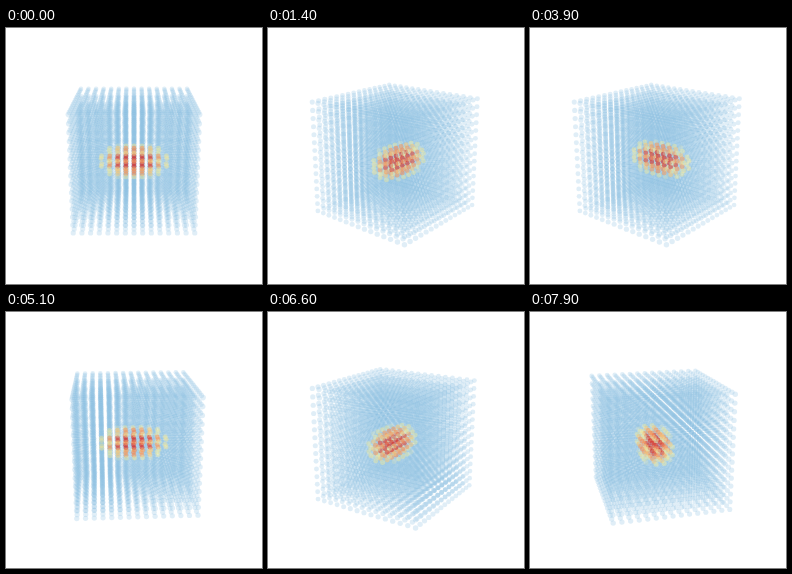
An HTML page with a canvas for the animation above (8 s loop, 256 px wide and 256 px high).

```html
<!DOCTYPE html>
<html lang="en">
<head>
<meta charset="utf-8">
<title>Rotating point grid</title>
<style>
  html, body { margin: 0; width: 100%; height: 100%; overflow: hidden; background: #fff; }
  canvas { display: block; width: 256px; height: 256px; }
</style>
</head>
<body>
<canvas id="stage" width="256" height="256"></canvas>
<script>
const ctx = document.getElementById('stage').getContext('2d');

const STEP_MS = 100, STEPS = 80, STEP_DEG = 3.6;
const HALF = 7;                        // 15 points along each side
const CENTER = 128, FOCAL = 525, DISTANCE = 9.27, RADIUS = 0.043;
const TILT = 18.5 * Math.PI / 180;
const SIN_TILT = Math.sin(TILT), COS_TILT = Math.cos(TILT);
const COOL = 'rgba(140,192,226,0.27)';

// Colour and opacity by squared distance from the core: [q, r, g, b, a]
const RAMP = [
  [0.10, 210, 50, 46, 0.66],
  [0.40, 224, 82, 64, 0.64],
  [0.60, 243, 148, 90, 0.58],
  [0.85, 250, 212, 124, 0.52],
  [1.05, 238, 232, 150, 0.45],
  [1.32, 198, 221, 200, 0.30]
];
const LIMIT = RAMP[RAMP.length - 1][0];

function heat(x, y, z) {
  return (x / 4.2) ** 2 + ((y - 0.5) / 2.1) ** 2 + ((z + 0.5) / 2.1) ** 2;
}

function rampColor(q) {
  const i = Math.max(1, RAMP.findIndex(stop => q <= stop[0]));
  const lo = RAMP[i - 1], hi = RAMP[i];
  const k = Math.max(0, (q - lo[0]) / (hi[0] - lo[0]));
  return `rgba(${lo.slice(1).map((v, n) => v + (hi[n + 1] - v) * k).join(',')})`;
}

const cool = [], hot = [];
for (let x = -HALF; x <= HALF; x++)
  for (let y = -HALF; y <= HALF; y++)
    for (let z = -HALF; z <= HALF; z++) {
      const q = heat(x, y, z);
      const point = { x: x / HALF, y: y / HALF, z: z / HALF };
      if (q < LIMIT) hot.push({ ...point, color: rampColor(q) });
      else cool.push(point);
    }

function project(p, sin, cos) {
  const side = p.x * cos + p.y * sin;
  const near = p.y * cos - p.x * sin;
  const depth = DISTANCE - near * COS_TILT - p.z * SIN_TILT;
  const scale = FOCAL / depth;
  return {
    x: CENTER + side * scale,
    y: CENTER - (p.z * COS_TILT - near * SIN_TILT) * scale,
    r: RADIUS * scale,
    depth,
    color: p.color || COOL
  };
}

function dot(p) {
  ctx.fillStyle = p.color;
  ctx.beginPath();
  ctx.arc(p.x, p.y, p.r, 0, Math.PI * 2);
  ctx.fill();
}

function draw(step) {
  const angle = step * STEP_DEG * Math.PI / 180;
  const sin = Math.sin(angle), cos = Math.cos(angle);
  const place = p => project(p, sin, cos);
  ctx.fillStyle = '#fff';
  ctx.fillRect(0, 0, 256, 256);
  cool.map(place).forEach(dot);
  hot.map(place).sort((a, b) => b.depth - a.depth).forEach(dot);
}

let shown = -1;
function tick() {
  const step = Math.floor(performance.now() / STEP_MS) % STEPS;
  if (step !== shown) draw(shown = step);
  requestAnimationFrame(tick);
}
tick();
</script>
</body>
</html>
```
